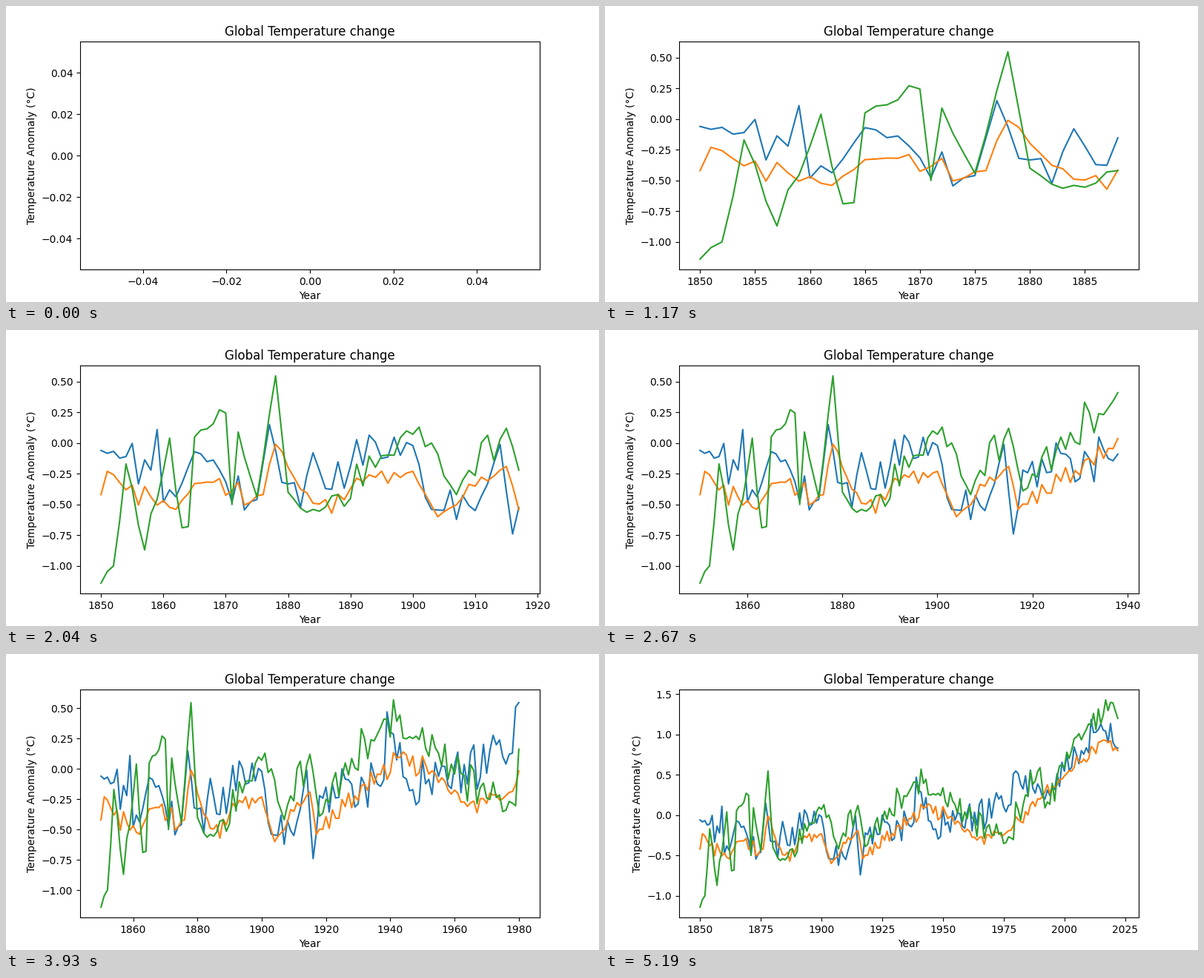
A matplotlib script that plays this animation: 800x400 px, repeating every 5220 ms.

```python
import numpy as np
import matplotlib.pyplot as plt
from matplotlib.animation import FuncAnimation

years = np.arange(1850, 2023)
rng = np.random.default_rng(7)


def noise():
    return rng.uniform(-1, 1, len(years))


shared = noise()


def series(spread, turns):
    """Straight runs between turning points, with wiggles that fade near them."""
    x, y = np.transpose(turns)
    gap = np.abs(years[:, None] - x).min(axis=1)
    wiggle = (shared + noise()) * np.minimum(gap / 3, 1)
    return np.interp(years, x, y) + spread * wiggle


curves = [
    series(.13, [
        (1850, -.06), (1858, -.22), (1859, .11), (1860, -.48), (1865, -.07),
        (1875, -.46), (1877, .15), (1879, -.32), (1900, -.02), (1903, -.54),
        (1910, -.55), (1914, -.01), (1916, -.74), (1918, -.22), (1938, -.09),
        (1939, .47), (1946, -.18), (1978, .13), (1979, .51), (1992, .2),
        (2015, 1.13), (2022, .83)]),
    series(.07, [
        (1850, -.42), (1851, -.23), (1862, -.54), (1865, -.33), (1876, -.42),
        (1878, -.01), (1884, -.49), (1900, -.23), (1904, -.6), (1915, -.19),
        (1917, -.54), (1944, .14), (1964, -.31), (1976, -.22), (2016, .93),
        (2022, .8)]),
    series(.13, [
        (1850, -1.14), (1852, -1), (1854, -.17), (1857, -.87), (1861, .04),
        (1863, -.69), (1864, -.68), (1865, .05), (1870, .245), (1871, -.5),
        (1872, .09), (1875, -.44), (1878, .547), (1880, -.4), (1884, -.54),
        (1901, .13), (1907, -.42), (1915, .12), (1918, -.39), (1938, .41),
        (1948, .27), (1976, -.34), (1990, .59), (1992, .09), (2005, .97),
        (2020, 1.39), (2022, 1.2)]),
]

fig, ax = plt.subplots(figsize=(8, 4), dpi=100)


def draw(n):
    """Show the first n years and let the axes rescale to them."""
    ax.clear()
    for values in curves:
        ax.plot(years[:n], values[:n])
    ax.set_title("Global Temperature change")
    ax.set_xlabel("Year")
    ax.set_ylabel("Temperature Anomaly (°C)")


anim = FuncAnimation(fig, draw, frames=len(years) + 1, interval=30, repeat=True)
plt.show()
```
